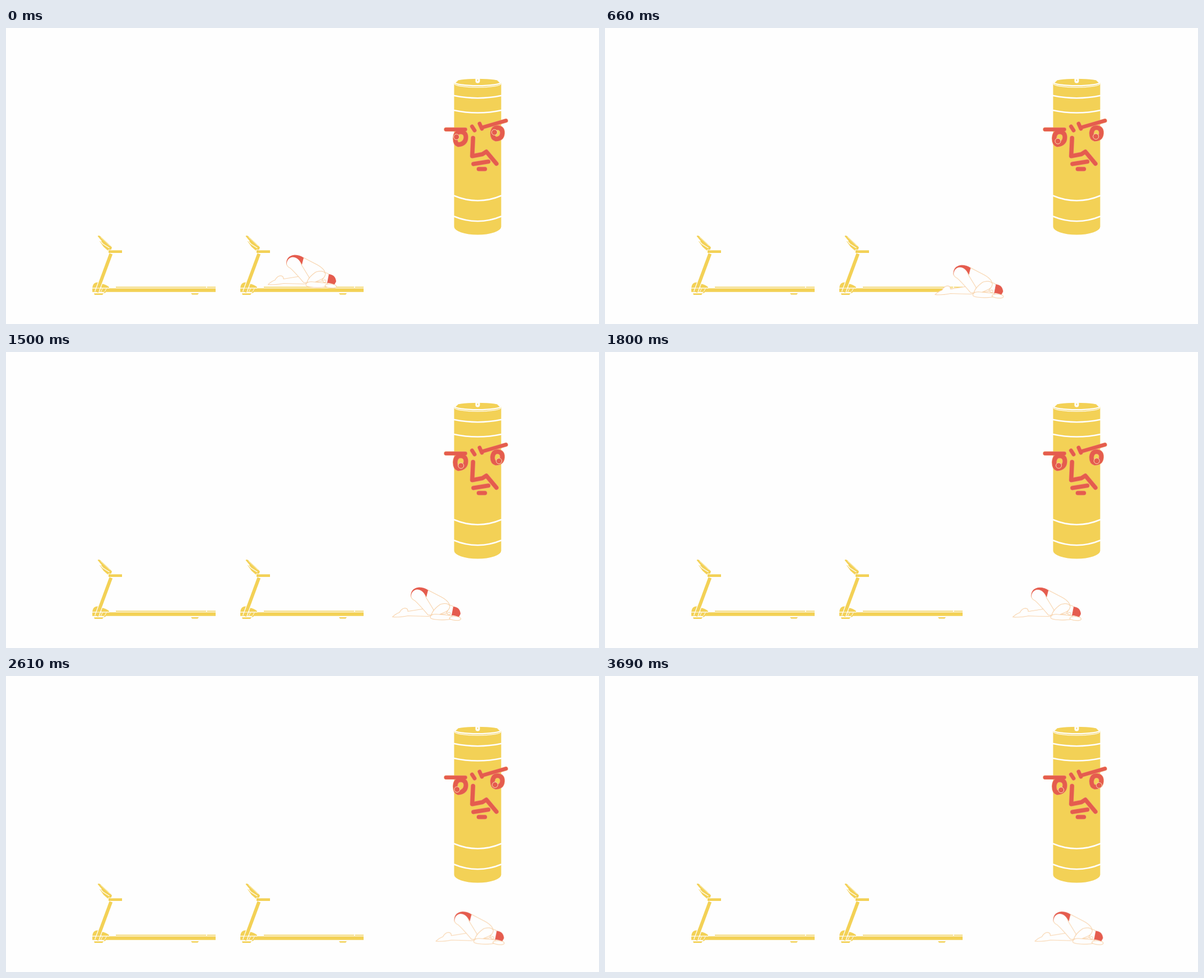
Write an HTML page with a canvas that moves like this. It is 1058 by 529 pixels and loops after 6060 ms.

```html
<!DOCTYPE html>
<html lang="en">
<head>
<meta charset="utf-8">
<title>Treadmills</title>
<style>
  html, body { margin: 0; width: 100%; height: 100%; overflow: hidden; background: #fefefe; }
  canvas { display: block; width: 1058px; height: 529px; }
</style>
</head>
<body>
<canvas id="stage" width="1058" height="529"></canvas>
<script>
const LOOP = 6060, STEP = 30, MOTION_END = 3690;
const PAPER = '#fefefe', YELLOW = '#f3d156', RED = '#e55c4e', SKIN = '#f8d3ab', EDGE = '#f0a070';
const stage = document.getElementById('stage').getContext('2d');

// Keyframes are [time, value] pairs, joined by straight lines.
const moveX = [[0, 0], [300, 87.5], [390, 112], [630, 118], [1020, 161], [1500, 222], [2110, 299.5]];
const moveY = [[0, 0], [300, -.7], [420, 0], [510, 6], [630, 20], [720, 14.3], [1020, 14.3], [1500, 15], [2110, 15.5]];
const gazeX = [[0, 0], [300, 1.2], [630, 4], [1020, 7.8], [1240, 10], [2530, .4], [3120, 5.2], [3690, 10]];
const gazeY = [[0, 0], [300, 5], [480, 7.2], [1020, 8], [1240, 8.6], [2100, 8], [3120, 8.2], [3690, 9]];

function track(keys, t) {
  const i = keys.findIndex(key => key[0] > t);
  if (i < 0) return keys[keys.length - 1][1];
  if (i === 0) return keys[0][1];
  const [t0, a] = keys[i - 1], [t1, b] = keys[i];
  return a + (b - a) * (t - t0) / (t1 - t0);
}

function makeLayer(width, height, scale, paint) {
  const canvas = document.createElement('canvas');
  canvas.width = width * scale;
  canvas.height = height * scale;
  const c = canvas.getContext('2d');
  c.scale(scale, scale);
  c.lineCap = c.lineJoin = 'round';
  paint(c);
  return canvas;
}

function fill(c, d, color) {
  c.fillStyle = color;
  c.fill(new Path2D(d));
}

function stroke(c, d, color, width) {
  c.strokeStyle = color;
  c.lineWidth = width;
  c.stroke(new Path2D(d));
}

function treadmill(c) {
  // Console and handle
  fill(c, 'M163.5 372 Q165 370 168 372 L181 384 L189 392 L187 398 L182 398 L174 391 L167 381 L171 381 Z', YELLOW);
  stroke(c, 'M166 378 L173 386 L184 393', PAPER, 1.4);
  stroke(c, 'M169 374 L185 389', PAPER, .7);
  fill(c, 'M183 397.3 H207 V402 H183 Z', YELLOW);
  stroke(c, 'M182.5 402 V396.6 H190', PAPER, 1);
  // Deck and belt
  fill(c, 'M154 465.3 H374 V471.8 H154 Z M196 462.6 H357 V464 H196 Z M358.5 462.6 H374 V464 H358.5 Z', YELLOW);
  // Motor hood
  fill(c, 'M154 464.5 Q155 454 164 454.5 L163 464.5 Z M170 464.5 V457 Q178 458 184 463 V464.5 Z', YELLOW);
  c.lineCap = 'butt';
  stroke(c, 'M187.3 403.5 L162 472', PAPER, 8.5);
  stroke(c, 'M187.3 403.5 L162 472', YELLOW, 6);
  c.lineCap = 'round';
  stroke(c, 'M154 465 H184 M169 472 L172 466 M175 473 L179 466', PAPER, 1);
  fill(c, 'M157 474.3 H174 L172 477 H158 Z M330 474 H344 L342 476.6 H332 Z M174 474 L177 470 L178 473 Z', YELLOW);
}

function barrel(c) {
  fill(c, 'M799.5 97 A42 6.2 0 0 1 883.5 97 V355 A42 14.5 0 0 1 799.5 355 Z', YELLOW);
  stroke(c, 'M800 97 A41.5 6.2 0 0 0 883 97', PAPER, 2.3);
  stroke(c, 'M800 99.5 A41.5 6.6 0 0 0 883 99.5', PAPER, 1.2);
  stroke(c, 'M800.5 97.5 L805 93.5 M882.5 97.5 L878 93.5', PAPER, 2.5);
  stroke(c, 'M841.5 91.5 V94.5', PAPER, 8);
  fill(c, 'M840.8 92 H842.2 V95 H840.8 Z', YELLOW);
  c.lineCap = 'butt';
  for (const [y, sag] of [[120.8, 4.4], [147, 4.6], [299.5, 9], [336.5, 8.8]])
    stroke(c, `M799 ${y} Q820 ${y + sag} 841.5 ${y + sag} T884 ${y}`, PAPER, 2.5);
  c.lineCap = 'round';
}

function face(c) {
  const features = [
    ['M785 181.3 H819.5 M849.5 177.8 L892 165.6', 6.2],
    ['M831.5 176 L836 183 M845 171 L849 180', 6.5],
    ['M833.3 196.5 L831.8 229 L850 225.5 L857 221 L875 242.5', 7.2],
    ['M834 243 L860.5 238.8 M843.5 252 H854.5', 7.2],
    ['M801.5 197 Q802 186 811 185.5 Q821 186 820.5 196 Q820 207 807 208.5 Q801.5 207 801.5 197 Z', 7.6],
    ['M868 188 Q869 178 877 178 Q886 179 885.5 188 Q885 198 874 198.5 Q868 197 868 188 Z', 7.6]
  ];
  for (const [d, width] of features) stroke(c, d, EDGE, width + 1.3);
  for (const [d, width] of features) stroke(c, d, RED, width);
}

function figure(c) {
  c.translate(-460, -400);
  const part = d => { fill(c, d, PAPER); stroke(c, d, SKIN, 1.1); };
  // Lower leg, torso, thigh
  part('M467.5 458.5 Q473 453 480 450.5 Q484 443 490 442.8 Q495 443 495 448.5 L523 444 L540 455 L532 457.5 L495 456.5 Q480 459.5 467.5 458.5 Z');
  part('M531 410.5 L555 423 Q566 429 569 436 L572 444 L562 453 L540 455 L526 424 Z');
  part('M500.5 422 Q500 408 513 408 Q523 409 527 423 L541 446 L537 455 L531 455 Q515 436 507 429 Q502 427 500.5 422 Z');
  fill(c, 'M500.3 424 Q499 407 515 405.5 Q524 405.5 531 410.5 L528 423 Q521 409 511 409.5 Q501 411 500.3 424 Z', RED);
  // Head
  part('M567 437 Q573 437 577 441 L574 456 L568 455 Q562 452 566 448 Z');
  fill(c, 'M576 440 Q588 441 589 453 L586 458.5 Q580 456 573 455.5 Z', RED);
  stroke(c, 'M566 452 Q569 448 571 452 Q570 456 567 454', SKIN, 1);
  // Arms and hand
  part('M537 454 Q541 444 553 436 Q566 432 570 439 Q569 447 561 450 L549 455 Z');
  part('M535 459 Q536 453.5 545 453.5 L573 456 L575 462 Q559 465 544 463 Q535 462 535 459 Z');
  part('M570 459 Q577 456 587 459 Q593 463 585 464.7 Q575 465 569 461.5 Z');
}

const SPRITE_W = 140, SPRITE_H = 72;
const sprite = makeLayer(SPRITE_W, SPRITE_H, 2, figure);
const scenery = makeLayer(1058, 529, 1, c => {
  c.fillStyle = PAPER;
  c.fillRect(0, 0, 1058, 529);
  for (const x of [0, 264]) {
    c.save();
    c.translate(x, 0);
    treadmill(c);
    c.restore();
  }
  barrel(c);
  face(c);
});
const smear = makeLayer(1058, 529, 1, c => { c.imageSmoothingQuality = 'high'; });
const smearCtx = smear.getContext('2d');

// Averages several positions, so quick moves blur along their path.
function drawFigure(t) {
  const speed = track(moveX, t + STEP) - track(moveX, t);
  const samples = t > 0 && speed > 6 ? 8 : 1;
  smearCtx.clearRect(0, 0, 1058, 529);
  smearCtx.globalCompositeOperation = 'lighter';
  smearCtx.globalAlpha = 1 / samples;
  for (let i = 0; i < samples; i++) {
    const at = t + (samples > 1 ? (i / (samples - 1) - .5) * STEP / 2 : 0);
    smearCtx.drawImage(sprite, 460 + track(moveX, at), 400 + track(moveY, at), SPRITE_W, SPRITE_H);
  }
  stage.drawImage(smear, 0, 0);
}

function drawPupil(x, y) {
  stage.beginPath();
  stage.arc(x, y, 5, 0, Math.PI * 2);
  stage.fillStyle = RED;
  stage.fill();
  stage.strokeStyle = '#f9dfb4';
  stage.lineWidth = 1;
  stage.stroke();
}

function render() {
  const clock = performance.now() % LOOP;
  const t = Math.min(MOTION_END, Math.floor(clock / STEP) * STEP);
  stage.drawImage(scenery, 0, 0);
  drawFigure(t);
  const dx = track(gazeX, t), dy = track(gazeY, t);
  drawPupil(803.7 + dx, 194.7 + dy);
  drawPupil(871.5 + dx, 186.4 + dy);
  requestAnimationFrame(render);
}
render();
</script>
</body>
</html>
```
